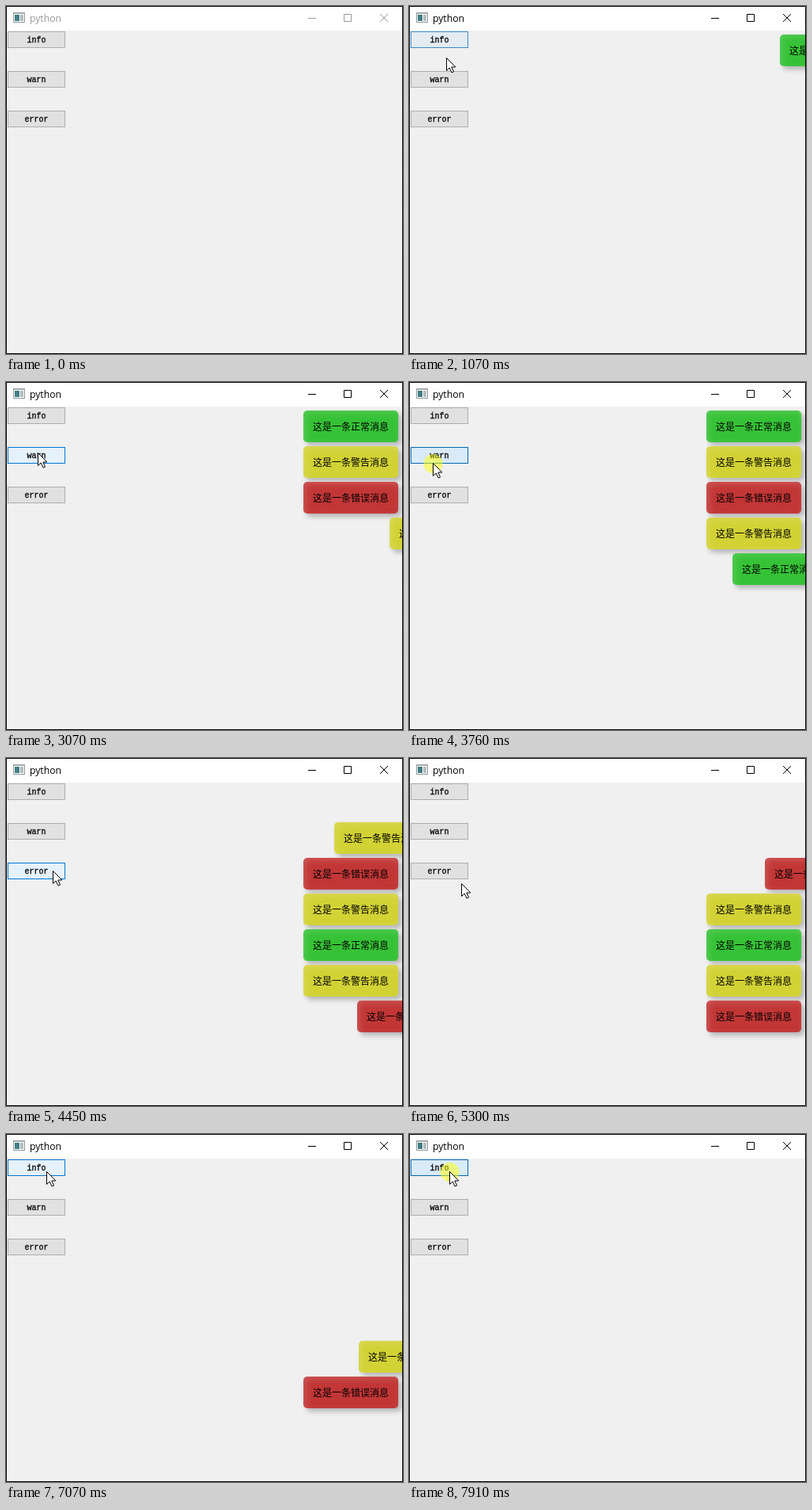
Recreate the animation shown at these times as an HTML page. Size 502 px wide and 439 px high, loop 7.99 s.

```html
<!DOCTYPE html>
<html lang="zh-CN">
<head>
<meta charset="utf-8">
<title>python</title>
<style>
html, body { margin: 0; width: 100%; height: 100%; overflow: hidden; }
#win { position: absolute; left: 0; top: 0; width: 502px; height: 439px; overflow: hidden; background: #f0f0f0; }
svg { position: absolute; left: 0; top: 0; }
#title { font: 12.2px "Open Sans", "Noto Sans", sans-serif; }
.btn, .toast { position: absolute; box-sizing: border-box; text-align: center; color: #000; }
.btn {
  left: 2px; width: 73px; height: 21px; border: 1px solid;
  font: 10px/22px "Liberation Mono", monospace; -webkit-text-stroke: .3px #000;
}
.toast {
  width: 120px; height: 40px; border-radius: 5px; white-space: nowrap;
  font: 12px/40px "Noto Sans CJK SC", "Noto Sans CJK", sans-serif;
  box-shadow: 4px 4px 6px rgba(0, 0, 0, .25), inset 3px 3px 9px rgba(255, 255, 255, .16);
}
</style>
</head>
<body>
<div id="win">
  <svg width="502" height="439">
    <path fill="#fff" d="M0 0H502V31H0z"/>
    <path fill="#fff" stroke="#90959a" d="M9.5 8.5h14v12h-14z"/>
    <path fill="#a4a9ad" d="M9 8h15v2H9z"/>
    <path fill="#3f7f83" d="M11 11h6v8h-6z"/>
    <path fill="#b5bcc0" d="M18 11h4v8h-4z"/>
    <text id="title" x="30" y="20">python</text>
    <path id="controls" fill="none" d="M382 15.5h10M427.5 10.5h9v9h-9zM473 10l10 10M483 10l-10 10"/>
  </svg>
</div>
<script>
const LOOP = 7990, SLIDE = 500, LIFE = 2965, MOVE = 250, ARRIVE = 120, PRESS = 100;
const win = document.getElementById('win');
const title = document.getElementById('title'), controls = document.getElementById('controls');

const kinds = {
  info: ['正常', '#36c236'],
  warn: ['警告', '#d2d235'],
  error: ['错误', '#c23636']
};
// Where the pointer stops: release time, x, y, button clicked there
const stops = [
  [939, 48, 45, 'info'], [1330, 48, 93, 'warn'], [2042, 53, 142, 'error'],
  [3002, 40, 95, 'warn'], [3391, 45, 41, 'info'], [3830, 31, 102, 'warn'],
  [4222, 60, 142, 'error'], [4900, 67, 158], [5980, 52, 47], [LOOP, 52, 47, 'info']
];
const clicks = stops.filter(s => s[3]);
const ENTER = stops[0][0] - ARRIVE - MOVE, ACTIVE = stops[0][0] - PRESS;

function add(cls, text, top) {
  const el = document.createElement('div');
  el.className = cls;
  el.textContent = text;
  el.style.top = top + 'px';
  win.append(el);
  return el;
}

const buttons = Object.keys(kinds).map((name, i) => {
  const top = 32 + 50 * i;
  return { top, el: add('btn', name, top) };
});
const toasts = clicks.filter(c => c[0] < LOOP).map(([start, , , kind], i) => {
  const [word, color] = kinds[kind];
  const el = add('toast', `这是一条${word}消息`, 36 + 45 * i);
  el.style.backgroundColor = color;
  return { el, start };
});
win.insertAdjacentHTML('beforeend', `<svg width="502" height="439">
  <g id="cursor"><circle id="halo" cx="-.5" cy="1" r="12" fill="#ff0" fill-opacity=".5"/>
  <path fill="#fff" stroke="#000" d="M-.5 .5V16.5L3.2 13L6 19L8.5 18L5.8 12H10.8z"/></g>
  <path fill="none" stroke="#000" d="M.5 .5h501v438H.5z"/></svg>`);
const cursor = document.getElementById('cursor'), halo = document.getElementById('halo');

const clamp = v => Math.max(0, Math.min(1, v));
const ease = p => p * p * (3 - 2 * p);
const mix = (a, b, p) => `rgb(${a.map((v, i) => Math.round(v + (b[i] - v) * p))})`;

// Each move ends shortly before the stop's release time
function pointer(t) {
  if (t < ENTER) return [-99, -99];
  let x = 120, y = 388;
  for (const [time, sx, sy] of stops) {
    const p = ease(clamp((t - time + ARRIVE + MOVE) / MOVE));
    x += (sx - x) * p;
    y += (sy - y) * p;
  }
  return [x, y];
}

function over(button, t) {
  const [x, y] = pointer(t);
  return x >= 2 && x < 75 && y >= button.top && y < button.top + 21;
}

// Share of the last 150 ms spent over the button: the hover fade
function hover(button, t) {
  let n = 0;
  for (let k = 0; k < 15; k++) n += over(button, t - 10 * k);
  return n / 15;
}

function draw(t) {
  const ink = t < ACTIVE ? '#999' : '#000';
  title.setAttribute('fill', ink);
  controls.setAttribute('stroke', ink);

  const pressed = clicks.some(([time]) => t >= time - PRESS && t < time);
  for (const b of buttons) {
    const h = hover(b, t), down = pressed && over(b, t);
    b.el.style.backgroundColor = down ? '#d9eaf8' : mix([225, 225, 225], [229, 241, 251], h);
    b.el.style.borderColor = down ? '#0069b5' : mix([173, 173, 173], [0, 120, 215], h);
  }
  for (const { el, start } of toasts) {
    const away = 1 - clamp((t - start) / SLIDE) + clamp((t - start - LIFE) / SLIDE);
    el.style.left = Math.round(376 + 126 * away) + 'px';
  }
  const [x, y] = pointer(t).map(Math.round);
  cursor.setAttribute('transform', `translate(${x} ${y})`);
  halo.style.display = pressed ? '' : 'none';
}

const begin = performance.now();
function tick() {
  draw((performance.now() - begin) % LOOP);
  requestAnimationFrame(tick);
}
tick();
</script>
</body>
</html>
```
